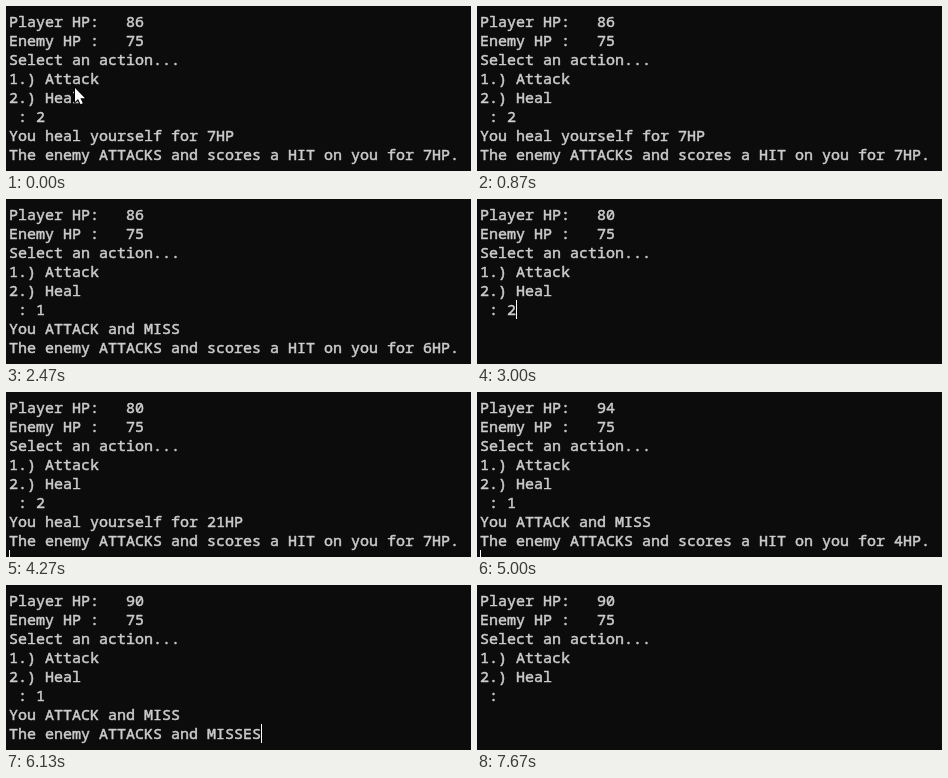
Recreate the animation shown at these times as an HTML page with a canvas. Size 465 by 165 pixels, loop 8340 ms.

```html
<!DOCTYPE html>
<html lang="en">
<head>
<meta charset="utf-8">
<title>Battle console</title>
<style>
  html, body { margin: 0; width: 100%; height: 100%; overflow: hidden; background: #0c0c0c; }
  canvas { display: block; }
</style>
</head>
<body>
<canvas id="screen" width="465" height="165"></canvas>
<script>
const ctx = document.getElementById('screen').getContext('2d');
const LOOP = 8340, LEFT = 3, TOP = 6, COL = 9, ROW = 19, BASELINE = 15;

const hit = n => `The enemy ATTACKS and scores a HIT on you for ${n}HP.`;
const heal = n => `You heal yourself for ${n}HP`;
const miss = 'You ATTACK and MISS';
const enemyMiss = 'The enemy ATTACKS and MISSES';

const menu = (hp, choice = '', ...result) => [
  `Player HP:   ${hp}`, 'Enemy HP :   75', 'Select an action...',
  '1.) Attack', '2.) Heal', ` : ${choice}`, ...result
];

// Cursor cells as [column, row]
const prompt = [3, 5], typed = [4, 5], next = [0, 8], lineEnd = [28, 7];

const first = menu(86, 2, heal(7), hit(7));
const second = menu(86, 1, miss, hit(6));
const third = menu(80, 2, heal(21), hit(7));

// Start time, screen lines, cursor cell (none while blinked off)
const steps = [
  [0, first],
  [330, first, next],
  [870, first],
  [1070, menu(86), prompt],
  [1530, menu(86, 1), typed],
  [1870, second, next],
  [2470, second],
  [2600, []],
  [2670, menu(80), prompt],
  [3000, menu(80, 2), typed],
  [3270, third, next],
  [3870, third],
  [4270, third, next],
  [4330, menu(94), prompt],
  [4670, menu(94, 1), typed],
  [5000, menu(94, 1, miss, hit(4)), next],
  [5600, menu(90), prompt],
  [5930, menu(90, 1), typed],
  [6130, menu(90, 1, miss, enemyMiss), lineEnd],
  [6730, menu(90, 1, miss, enemyMiss)],
  [7070, menu(90), prompt],
  [7670, menu(90)]
];

const arrow = new Path2D('M69 82V96L72 93L74.6 98.3L76.8 97.3L74.4 92.2H79Z');

function drawPointer() {
  ctx.strokeStyle = '#000';
  ctx.lineWidth = 2;
  ctx.stroke(arrow);
  ctx.fillStyle = '#fff';
  ctx.fill(arrow);
}

// A thin outline gives the letters their sturdy weight
function drawLine(text, row) {
  const y = TOP + BASELINE + row * ROW;
  ctx.fillText(text, LEFT, y);
  ctx.strokeText(text, LEFT, y);
}

function draw(t) {
  const [, lines, cursor] = steps.findLast(step => step[0] <= t);
  ctx.fillStyle = '#0c0c0c';
  ctx.fillRect(0, 0, 465, 165);
  ctx.fillStyle = ctx.strokeStyle = '#ccc';
  ctx.lineWidth = 0.5;
  ctx.lineJoin = 'round';
  ctx.font = '15px "Noto Sans Mono", "DejaVu Sans Mono", monospace';
  lines.forEach(drawLine);
  if (cursor) {
    ctx.fillStyle = '#fff';
    ctx.fillRect(LEFT + cursor[0] * COL, TOP + cursor[1] * ROW, 1, ROW);
  }
  if (t < 70) drawPointer();
}

const start = performance.now();
function tick() {
  draw((performance.now() - start) % LOOP);
  requestAnimationFrame(tick);
}
tick();
</script>
</body>
</html>
```
